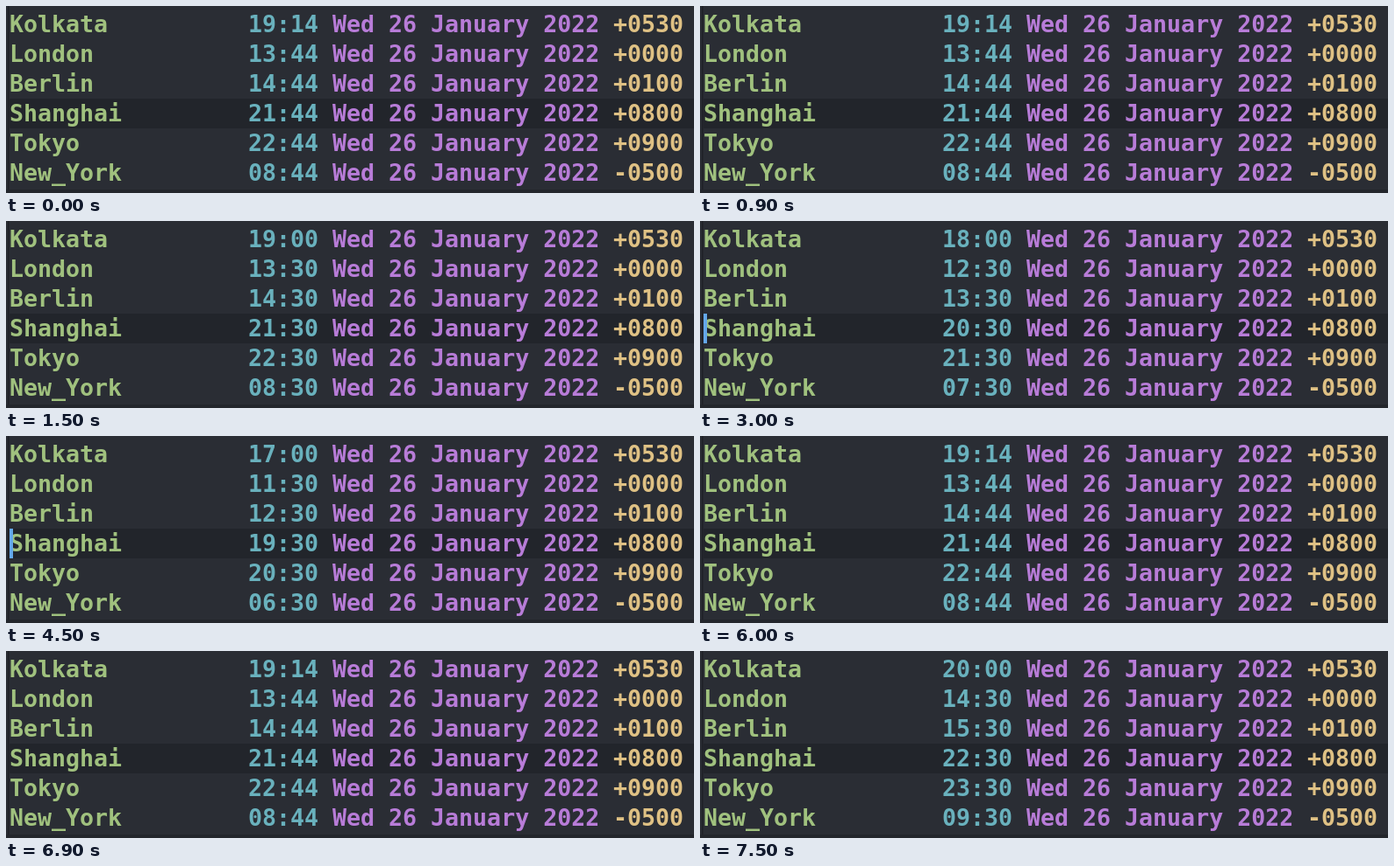
Animation, 784 px wide and 214 px high, one loop 8000 ms. Source, as an HTML page:

```html
<!DOCTYPE html>
<html lang="en">
<head>
<meta charset="utf-8">
<title>World clock</title>
<style>
  html, body { margin: 0; width: 100%; height: 100%; overflow: hidden; background: #2a2d34; }
  svg { display: block; width: 784px; height: 214px; }
  text { font: bold 26.6px "DejaVu Sans Mono", "Noto Sans Mono", monospace; white-space: pre; }
  .city { fill: #a0c17e; }
  .time { fill: #69b1bd; }
  .date { fill: #b87cd8; }
  .zone { fill: #dfc184; }
</style>
</head>
<body>
<svg viewBox="0 0 784 214">
  <rect width="784" height="214" fill="#2a2d34"/>
  <rect x="4" y="106" width="780" height="34" fill="#22252b"/>
  <rect x="2" width="1.5" height="210" fill="#1f2127"/>
  <rect y="210" width="784" height="4" fill="#23262c"/>
  <g id="rows"></g>
  <rect id="cursor" x="4" y="106" width="4" height="34" fill="#64a8ea"/>
</svg>
<script>
const LOOP = 8000, STEP = 1500, CELL = 16, LEFT = 4, ROW = 34, BASE = 30;
const cities = [
  ['Kolkata', 330], ['London', 0], ['Berlin', 60],
  ['Shanghai', 480], ['Tokyo', 540], ['New_York', -300]
];
// UTC time shown at each step, in minutes
const utc = [[13, 44], [13, 30], [12, 30], [11, 30], [13, 44], [14, 30]].map(([h, m]) => h * 60 + m);

const rows = document.getElementById('rows');
const cursor = document.getElementById('cursor');
const pad = n => String(n).padStart(2, '0');
const clock = (min, sep) => pad(Math.floor(min / 60)) + sep + pad(min % 60);

function put(cls, col, row, str) {
  const el = document.createElementNS('http://www.w3.org/2000/svg', 'text');
  el.setAttribute('class', cls);
  el.setAttribute('x', LEFT + col * CELL);
  el.setAttribute('y', BASE + row * ROW);
  el.textContent = str;
  return rows.appendChild(el);
}

const times = cities.map(([name, offset], i) => {
  put('city', 0, i, name);
  put('date', 23, i, 'Wed 26 January 2022');
  put('zone', 43, i, (offset < 0 ? '-' : '+') + clock(Math.abs(offset), ''));
  return put('time', 17, i, '');
});

let shown = -1;
function draw(now) {
  const step = Math.floor((now % LOOP) / STEP);
  if (step !== shown) {
    shown = step;
    times.forEach((el, i) => {
      el.textContent = clock((utc[step] + cities[i][1] + 1440) % 1440, ':');
    });
    cursor.setAttribute('visibility', step === 2 || step === 3 ? 'visible' : 'hidden');
  }
}

const start = performance.now();
function tick() {
  draw(performance.now() - start);
  requestAnimationFrame(tick);
}
tick();
</script>
</body>
</html>
```
